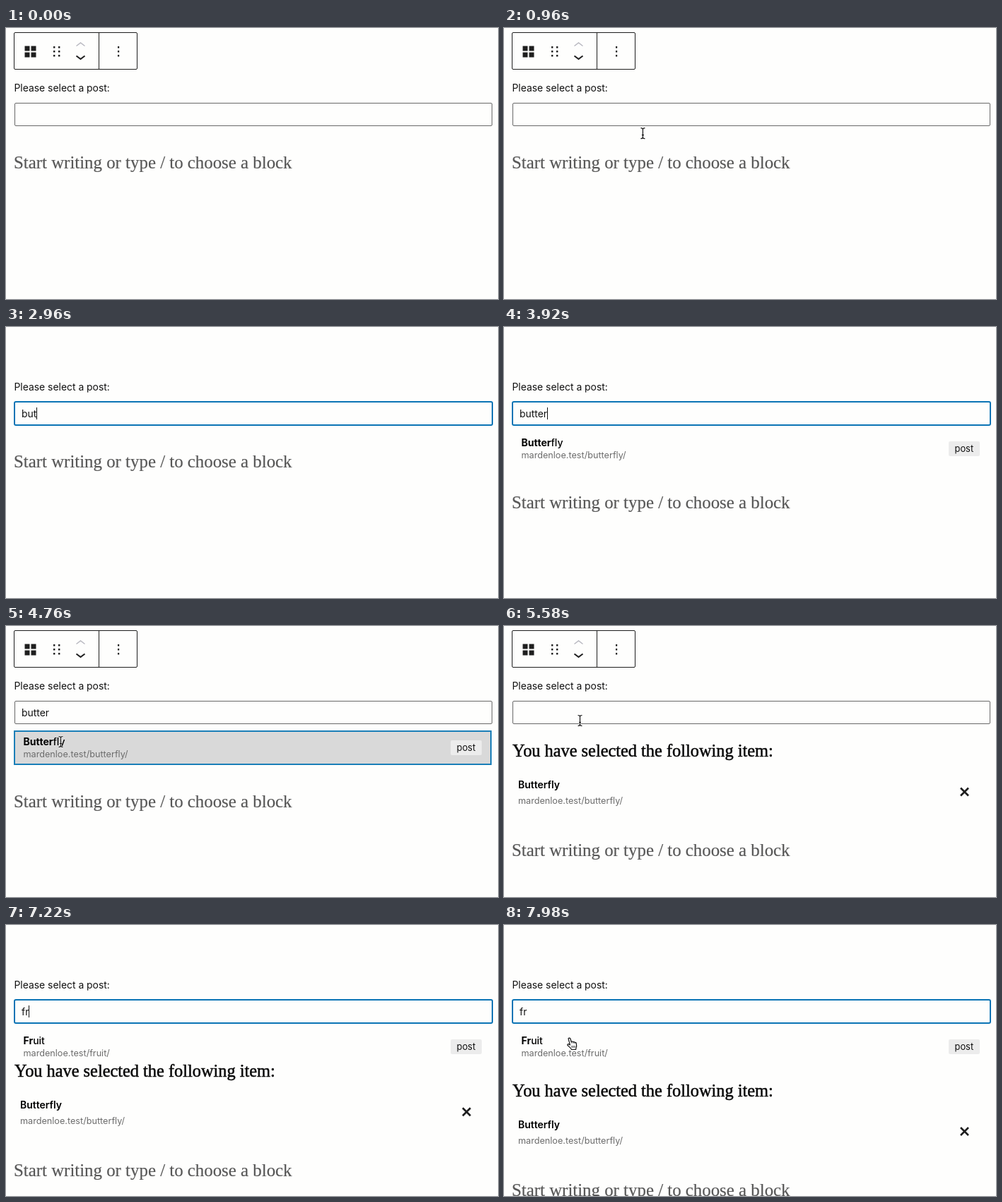
Recreate the animation shown at these times as an HTML page. Size 696 by 384 pixels, loop 8 s.

```html
<!DOCTYPE html>
<html lang="en">
<head>
<meta charset="utf-8">
<title>Post picker</title>
<style>
  html, body { margin: 0; width: 100%; height: 100%; overflow: hidden; background: #fefefd; }
  svg { display: block; width: 100vw; height: 100vh; }
  text { font: 400 13.9px Inter, sans-serif; fill: #111; }
  .title { font-size: 14px; font-weight: 500; fill: #000; }
  .strong { font-weight: 700; }
  .url { font-size: 12.65px; fill: #6c6c6c; }
  .tag { font-size: 12.9px; }
  .serif { font: 24.87px "Liberation Serif", serif; fill: #585858; stroke: #585858; stroke-width: .2; }
  .heading { font-size: 24.35px; fill: #080808; stroke: #080808; stroke-width: .5; }
  .line { fill: none; stroke: #1e1e1e; }
</style>
</head>
<body>
<svg viewBox="0 0 696 384">
  <g id="toolbar">
    <rect class="line" x="11.5" y="6.5" width="174" height="52" rx="1.5"/>
    <path class="line" d="M131.5 7v51"/>
    <path fill="#1e1e1e" d="M26.5 25.5h7v7h-7zM35.5 25.5h7v7h-7zM26.5 34.5h7v7h-7zM35.5 34.5h7v7h-7z"/>
    <path fill="#1e1e1e" d="M67 26h2.4v2.4h-2.4zM74 26h2.4v2.4h-2.4zM67 32h2.4v2.4h-2.4zM74 32h2.4v2.4h-2.4zM67 38h2.4v2.4h-2.4zM74 38h2.4v2.4h-2.4zM158 26h2.2v2.4h-2.2zM158 32h2.2v2.4h-2.2zM158 38h2.2v2.4h-2.2z"/>
    <path class="line" style="stroke:#b8b8c0" stroke-width="1.5" d="M99.5 25.5l6-4.5 6 4.5"/>
    <path class="line" stroke-width="2" d="M99.5 39.5l6 4.5 6-4.5"/>
  </g>

  <text x="11.5" y="90">Please select a post:</text>
  <rect id="field" fill="none"/>
  <text id="query" x="22" y="128"></text>
  <path id="caret" stroke="#111" d="M0 114v17"/>

  <g id="result">
    <rect id="highlight" x="12" y="149" width="674" height="47" fill="#d9d9d9" stroke="#1a7fb8" stroke-width="2"/>
    <text class="title" x="24.5" y="169"><tspan id="match" class="strong"></tspan><tspan id="rest"></tspan></text>
    <text id="resultUrl" class="url" x="24.5" y="186"></text>
    <rect x="629" y="162" width="44" height="21" rx="2" fill="#ececec"/>
    <text class="tag" x="637.5" y="177">post</text>
  </g>

  <g id="selection">
    <text class="serif heading" x="12" y="185">You have selected the following item:</text>
    <text class="title" style="font-weight:600" x="20" y="230">Butterfly</text>
    <text class="url" x="20" y="252">mardenloe.test/butterfly/</text>
    <path class="line" stroke-width="2.6" d="M646 229.5l11 11m0-11l-11 11"/>
  </g>

  <text id="placeholder" class="serif" x="11" y="199">Start writing or type / to choose a block</text>

  <g id="pointer">
    <g id="beam" fill="none">
      <path stroke="#fff" stroke-width="2.6" d="M-3-7.5q3 0 3 2v11q0 2-3 2M3-7.5q-3 0-3 2M3 7.5q-3 0-3-2M-1.5 2.5h3"/>
      <path stroke="#111" stroke-width="1.2" d="M-3-7.5q3 0 3 2v11q0 2-3 2M3-7.5q-3 0-3 2M3 7.5q-3 0-3-2M-1.5 2.5h3"/>
    </g>
    <g id="hand" stroke="#111" stroke-width="1.2" stroke-linejoin="round">
      <path fill="#fff" d="M-4-7.2c1-1.3 2.6-.8 3 .5l1.2 4.2c1-.8 2-.6 2.5.3c1-.6 2-.3 2.4.6c1.2-.4 2 .2 2.2 1.2c.4 2.2.8 4.5-.3 6.4l-.4 2.5h-6c-1.4-2.6-3.4-4-5.6-6c-.8-1 .4-2.2 1.8-1.6l1.6 1z"/>
      <path fill="none" stroke-width=".8" d="M.2-2.5l.5 2M2.7-2.2l.4 2M5.1-1.6l.3 1.8M1 3v3M3 3v3M5 3v3"/>
    </g>
  </g>
</svg>
<script>
const LOOP = 8000;
const ROW = 57.5;      // height of the open result list
const SELECTED = 127;  // height of the selection panel
const PRESS = 4680, CHOOSE = 4850;

// Each search: focus time, key press times, list opening time, end of focus
const searches = [
  { focus: 1300, keys: [2560, 2760, 2940, 3120, 3300, 3480], open: 3180, blur: PRESS, end: CHOOSE, word: "butter", title: "Butterfly" },
  { focus: 5950, keys: [6750, 7020], open: 7180, blur: LOOP, end: LOOP, word: "fr", title: "Fruit" }
];
const toolbarHidden = [[2560, 4300], [6750, LOOP]];
const pointerShown = [[800, 2560], [4200, 6750], [7500, LOOP]];
const pointerPath = [
  [800, 215, 165], [1250, 151.5, 111], [4200, 151.5, 111], [4600, 77.5, 164], [4950, 77.5, 164],
  [5500, 107.5, 134], [5800, 107.5, 134], [5950, 109.5, 129], [7500, 109.5, 129], [7850, 95, 168]
];

const $ = id => document.getElementById(id);
const show = (id, on) => $(id).setAttribute("visibility", on ? "inherit" : "hidden");
const put = (id, attrs) => { for (const k in attrs) $(id).setAttribute(k, attrs[k]); };
const within = (t, spans) => spans.some(([a, b]) => t >= a && t < b);
const clamp = v => Math.min(1, Math.max(0, v));
const smooth = v => v * v * (3 - 2 * v);
const easeOut = v => 1 - (1 - v) ** 3;

function pointerAt(t) {
  const i = pointerPath.findIndex(p => p[0] > t);
  if (i === 0) return pointerPath[0].slice(1);
  if (i < 0) return pointerPath.at(-1).slice(1);
  const [t0, x0, y0] = pointerPath[i - 1], [t1, x1, y1] = pointerPath[i];
  const k = smooth((t - t0) / (t1 - t0));
  return [x0 + (x1 - x0) * k, y0 + (y1 - y0) * k];
}

function draw(t) {
  const search = searches.find(s => t >= s.focus && t < s.end);
  const focused = !!search && t < search.blur;
  const pressed = search ? search.keys.filter(k => k <= t) : [];
  const typed = search ? search.word.slice(0, pressed.length) : "";
  const open = !!search && t >= search.open;
  const chosen = t >= CHOOSE;

  show("toolbar", !within(t, toolbarHidden));
  put("field", focused
    ? { x: 12, y: 106, width: 676, height: 33, rx: 2, stroke: "#0b74b5", "stroke-width": 2 }
    : { x: 12.5, y: 106.5, width: 675, height: 32, rx: 1.5, stroke: "#686868", "stroke-width": 1 });

  $("query").textContent = typed;
  const lastInput = pressed.at(-1) ?? search?.focus;
  show("caret", focused && (t - lastInput) % 1000 < 500);
  const caretX = 22.5 + (typed ? Math.round($("query").getComputedTextLength()) : 0);
  put("caret", { transform: `translate(${caretX} 0)` });

  show("result", open);
  show("highlight", open && t >= search.blur);
  if (open) {
    $("match").textContent = search.title.slice(0, typed.length);
    $("rest").textContent = search.title.slice(typed.length);
    $("resultUrl").textContent = `mardenloe.test/${search.title.toLowerCase()}/`;
  }

  const shift = open ? ROW * easeOut(clamp((t - search.open) / 190)) : 0;
  show("selection", chosen);
  put("selection", { transform: `translate(0 ${shift})` });
  put("placeholder", { transform: `translate(0 ${shift + (chosen ? SELECTED : 0)})` });

  const [x, y] = pointerAt(t);
  const overResult = open && y > 148 && t < search.blur;
  show("pointer", within(t, pointerShown));
  put("pointer", { transform: `translate(${x} ${y})` });
  show("beam", !overResult);
  show("hand", overResult);
}

const start = performance.now();
function tick() {
  draw((performance.now() - start) % LOOP);
  requestAnimationFrame(tick);
}
tick();
</script>
</body>
</html>
```
